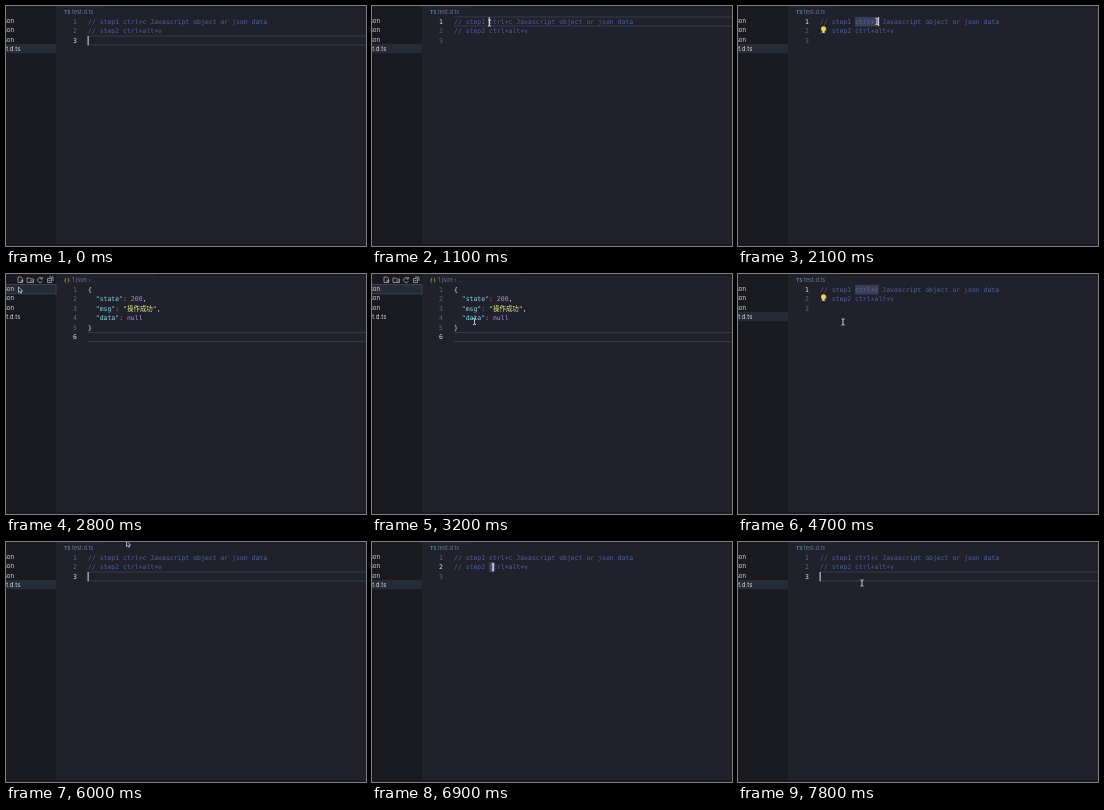
Animation of 360x240 px, one loop 8000 ms. Source, as an HTML page:

```html
<!DOCTYPE html>
<html lang="en">
<head>
<meta charset="utf-8">
<title>Editor walkthrough</title>
<style>
  html, body { margin: 0; width: 100%; height: 100%; overflow: hidden; background: #20212b; }
  svg { display: block; width: 100vw; height: 100vh; }
  text { white-space: pre; }
  .code { font: 6.48px "DejaVu Sans Mono", "Noto Sans CJK SC", "Noto Sans CJK", monospace; }
  .ui { font: 6px Inter, sans-serif; fill: #d6d7dc; }
  .crumb { font: 5.6px Inter, sans-serif; fill: #6b7799; }
  .comment { fill: #5063a3; }
  .num { fill: #5b6796; text-anchor: end; }
  .num.on { fill: #e4e5ea; }
  .key { fill: #86dcef; }
  .op { fill: #d872b4; }
  .val { fill: #b18aec; }
  .str { fill: #e8f08a; }
  .plain { fill: #e8e8e4; }
  .sel { fill: #3c4056; }
</style>
</head>
<body>
<svg viewBox="0 0 360 240" preserveAspectRatio="none">
  <rect width="360" height="240" fill="#20212b"/>
  <rect width="50" height="240" fill="#191a20"/>
  <rect id="tabs" y="0" width="310" height="1.2" fill="#181920"/>
  <rect y="238.4" width="360" height="1.6" fill="#171820"/>
  <rect id="row" x="-1" width="51" height="9.4" fill="#262c36"/>
  <g id="files" class="ui"></g>
  <g id="icons" fill="none" stroke="#b9bac2" stroke-width=".7">
    <path d="M12 3h3l1.500 1.500V8.500H12zM14.500 7h3M16 5.500v3"/>
    <path d="M21 4h2.500l1 1h3v3.500H21zM24 7h3"/>
    <path d="M36 4.500A2.500 2.500 0 1 0 36.400 7M36.300 3v2h-2"/>
    <path d="M41.500 4.500h4v4h-4zM43 3h4v4M42.500 6.500h2"/>
  </g>
  <g id="lineBox" fill="none" stroke="#3d3f4d" stroke-width=".9">
    <path d="M82 .5H360M82 9.500H360"/>
  </g>
  <g id="selection" class="sel"></g>
  <g id="tsView" class="code"></g>
  <g id="jsonView" class="code"></g>
  <g id="bulb">
    <circle cx="85.500" cy="22.800" r="2.500" fill="#f5d33b"/>
    <rect x="84.400" y="24.800" width="2.200" height="2.200" fill="#d9dbe0"/>
  </g>
  <rect id="caret" width="1" height="9.200" fill="#e4e5e8"/>
  <path id="beam" d="M-1.500-3.200Q0-3.200 0-2.200 0-3.200 1.500-3.200M0-2.200V2.200M-1.500 3.200Q0 3.200 0 2.200 0 3.200 1.500 3.200" fill="none" stroke="#dddee2" stroke-width=".9"/>
  <path id="arrow" d="M-1.500-3V2.500L-.2 1.400.8 3.300 1.700 2.800.8 1 2.500.9z" fill="#16171c" stroke="#eeeeF2" stroke-width=".7"/>
</svg>
<script>
const LOOP = 8000, STEP = 100, CHAR = 3.9, LEFT = 82, PITCH = 9.52;
const $ = id => document.getElementById(id);
const make = (parent, tag, attrs, content = '') => {
  const el = document.createElementNS('http://www.w3.org/2000/svg', tag);
  for (const k in attrs) el.setAttribute(k, attrs[k]);
  el.textContent = content;
  return parent.appendChild(el);
};
const lineTop = n => 11 + (n - 1) * PITCH;
const column = c => LEFT + c * CHAR;
const show = (id, on) => $(id).setAttribute('display', on ? 'inline' : 'none');
const place = (id, x, y) => $(id).setAttribute('transform', `translate(${x} ${y})`);

// Each line is a list of [class, text] runs.
const tsLines = [
  [['comment', '// step1 ctrl+c Javascript object or json data']],
  [['comment', '// step2 ctrl+alt+v']],
  []
];
const pair = (name, ...rest) => [['key', `  "${name}"`], ['op', ': '], ...rest];
const jsonLines = [
  [['plain', '{']],
  pair('state', ['val', '200'], ['plain', ',']),
  pair('msg', ['str', '"操作成功"'], ['plain', ',']),
  pair('data', ['val', 'null']),
  [['plain', '}']],
  []
];

function buildView(id, lines, tag, tagColor, title, titleX) {
  const view = $(id);
  make(view, 'text', { class: 'crumb', x: 58, y: 8, style: `fill:${tagColor};font-size:5px;font-weight:600` }, tag);
  make(view, 'text', { class: 'crumb', x: titleX, y: 8 }, title);
  return lines.map((runs, i) => {
    const y = lineTop(i + 1) + 6.8;
    const text = make(view, 'text', { x: LEFT, y });
    runs.forEach(([cls, str]) => make(text, 'tspan', { class: cls }, str));
    return make(view, 'text', { class: 'num', x: 71, y }, i + 1);
  });
}
const tsNums = buildView('tsView', tsLines, 'TS', '#4b91b8', 'test.d.ts', 66);
const jsonNums = buildView('jsonView', jsonLines, '{ }', '#c9b84f', '1.json › ...', 66);

['1.json', '2.json', '3.json', 'test.d.ts'].forEach((name, i) =>
  make($('files'), 'text', { x: i < 3 ? 8 : 14.3, y: 17.3 + i * 9.1, 'text-anchor': 'end' }, name));

const bars = Array.from({ length: 5 }, () => make($('selection'), 'rect', { height: 9.6 }));
function select(spans) {
  bars.forEach((bar, i) => {
    const [line, x1, x2] = spans[i] || [1, 0, 0];
    bar.setAttribute('x', x1);
    bar.setAttribute('y', lineTop(line) - .1);
    bar.setAttribute('width', Math.max(0, x2 - x1));
  });
}

// Pointer path: time, x, y
const path = [
  [100, 182, 104], [500, 152, 57], [900, 118, 18], [1300, 117, 16],
  [2100, 139, 15.5], [2300, 139, 15.5], [2600, 42, 20], [2800, 14, 16],
  [2900, 18, 17], [3200, 102.5, 47.5], [3500, 113.5, 59], [3800, 113.5, 59],
  [4000, 128, 12], [4100, 132, -6], [4300, 132, -6], [4400, 126, 12],
  [4700, 105, 48], [5100, 112, 46], [5700, 112, 46], [6000, 122, 2],
  [6200, 128, 6], [6600, 117, 25], [6800, 117, 25], [7300, 156, 25],
  [7400, 156, 25], [7600, 128, 39], [7800, 124, 41], [8000, 124, 41]
];
const ease = p => p * p * (3 - 2 * p);
function pointerAt(t) {
  if (t < path[0][0]) return [-20, -20];
  const i = Math.max(1, path.findIndex(p => p[0] > t));
  const [t0, x0, y0] = path[i - 1], [t1, x1, y1] = path[i];
  const p = ease((t - t0) / (t1 - t0));
  return [x0 + (x1 - x0) * p, y0 + (y1 - y0) * p];
}

// Editor states: start, file, line, column, caret shown, line box shown
const states = [
  [0, 'ts', 3, 0, 1, 1],
  [1000, 'ts', 1, 9, 1, 1],
  [1400, 'ts', 1, 15, 1, 0],
  [2800, 'json', 6, 0, 0, 1],
  [3400, 'json', 6, 0, 1, 1],
  [3600, 'json', 6, 0, 1, 0],
  [4200, 'ts', 1, 15, 0, 0],
  [4800, 'ts', 3, 0, 1, 1],
  [6700, 'ts', 2, 9, 1, 1],
  [6900, 'ts', 2, 19, 1, 0],
  [7600, 'ts', 3, 0, 1, 1]
];

function draw(t) {
  const [start, file, line, endCol, caret, box] = states.findLast(s => s[0] <= t);
  const isJson = file === 'json';
  const [mx, my] = pointerAt(t);
  let col = endCol;

  let spans = [];
  if (isJson && start === 3600) {
    spans = [90, 141, 155.5, 141, 90].map((x, i) => [i + 1, LEFT, x]);
  } else if (!isJson && !box) {
    if (line === 2 || start === 1400)
      col = Math.max(9, Math.min(endCol, Math.round((mx - LEFT) / CHAR + .2)));
    spans = [[line, column(9), column(col)]];
  }
  select(spans);

  show('tsView', !isJson);
  show('jsonView', isJson);
  (isJson ? jsonNums : tsNums).forEach((n, i) => n.classList.toggle('on', i + 1 === line));
  show('lineBox', box);
  place('lineBox', 0, lineTop(line) - .5);

  const blink = start !== 4800 || Math.floor((t - start) / 500) % 2 === 0;
  show('caret', caret && blink);
  place('caret', column(col) - .4, lineTop(line));

  const focused = t >= 2800 && t < 3400;
  $('row').setAttribute('y', isJson ? 10.5 : 37.8);
  $('row').setAttribute('stroke', focused ? '#484c63' : 'none');
  $('row').setAttribute('stroke-width', .7);
  $('tabs').setAttribute('x', isJson ? 150 : 100);
  show('icons', t >= 2600 && t < 3400);
  show('bulb', (t >= 2000 && t < 2800) || (t >= 4200 && t < 4800));

  const overText = mx > 50 && my > 4;
  show('beam', overText);
  show('arrow', !overText);
  place('beam', mx, my);
  place('arrow', mx, my);
}

const began = performance.now();
function tick() {
  const t = (performance.now() - began) % LOOP;
  draw(Math.floor(t / STEP) * STEP);
  requestAnimationFrame(tick);
}
tick();
</script>
</body>
</html>
```
